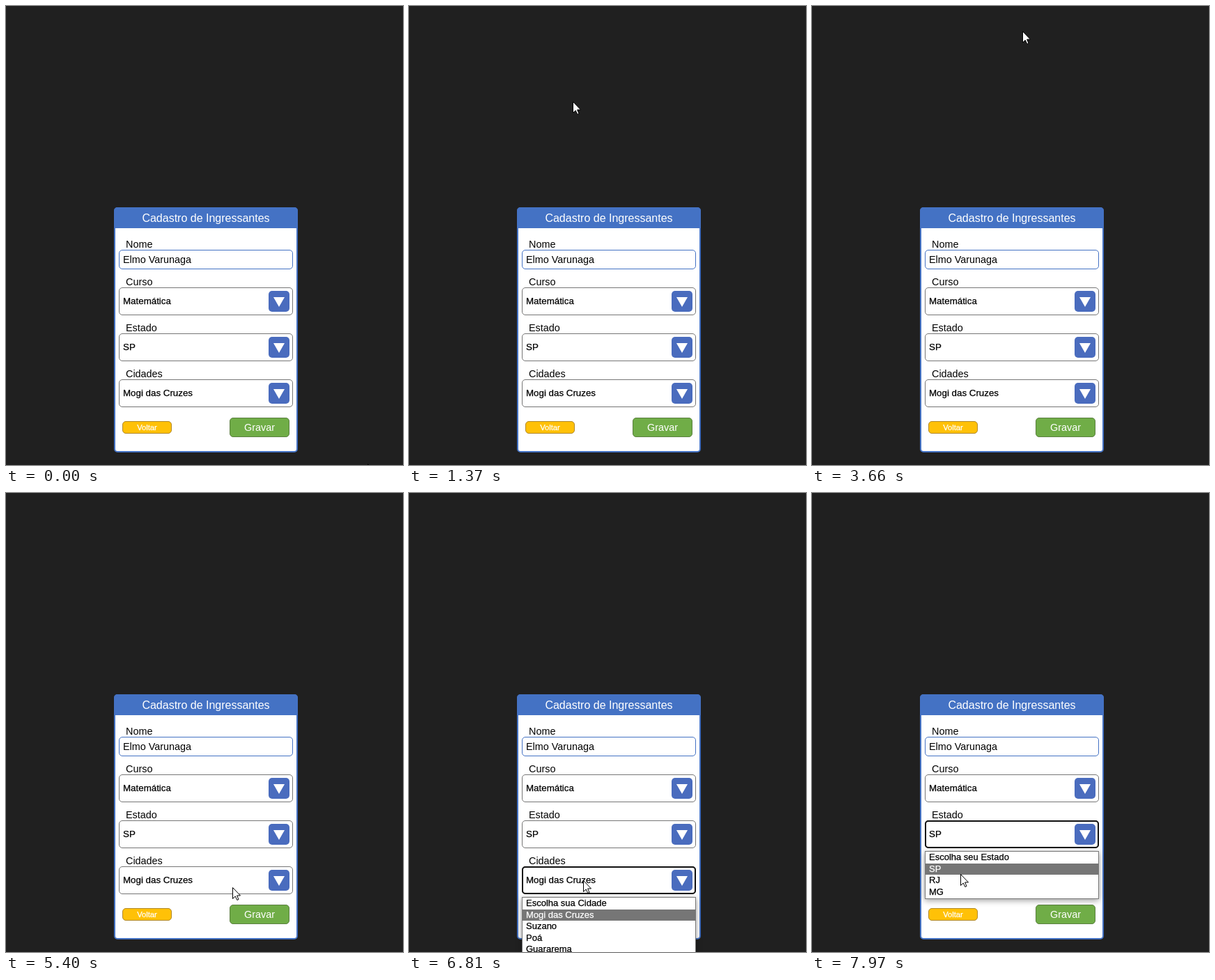
An HTML page that plays this animation: 570x659 px, repeating every 8 s.

```html
<!DOCTYPE html>
<html lang="pt-BR">
<head>
<meta charset="utf-8">
<title>Cadastro de Ingressantes</title>
<style>
  html, body { margin: 0; width: 100%; height: 100%; overflow: hidden; background: #202020; }
  svg { display: block; width: 570px; height: 659px; }
  text { font-family: "Liberation Sans", Arial, sans-serif; font-size: 14.4px; white-space: pre; }
  .title { font-size: 16px; }
  .value { font-size: 13.333px; }
  .item { font-size: 13px; }
  .small { font-size: 11.2px; }
  .value, .item, .small { stroke-width: .25px; }
  .popup { filter: drop-shadow(0 2px 4px rgba(0, 0, 0, .4)); }
</style>
</head>
<body>
<svg id="stage" viewBox="0 0 570 659"></svg>
<script>
const LOOP = 8000;
const BLUE = '#4472c4', GREY = '#767676';
const stage = document.getElementById('stage');

function add(parent, tag, attrs, content) {
  const el = document.createElementNS('http://www.w3.org/2000/svg', tag);
  for (const key in attrs) el.setAttribute(key, attrs[key]);
  if (content) el.textContent = content;
  parent.appendChild(el);
  return el;
}

// The radius and the size are those of the outer edge
function box(parent, x, y, width, height, fill, stroke = 'none', line = 0, radius = 5) {
  return add(parent, 'rect', {
    x: x + line / 2, y: y + line / 2, width: width - line, height: height - line,
    rx: Math.max(0, radius - line / 2), fill, stroke, 'stroke-width': line
  });
}

function write(parent, x, y, content, kind = '', fill = '#000', anchor = 'start') {
  const heavy = ['value', 'item', 'small'].includes(kind);
  return add(parent, 'text', {
    x, y, class: kind, fill, stroke: heavy ? fill : 'none', 'text-anchor': anchor
  }, content);
}

function button(x, y, width, height, label, fill, edge, kind, baseline) {
  box(stage, x, y, width, height, fill, edge, 1);
  write(stage, x + width / 2, baseline, label, kind, '#fff', 'middle');
}

function drawField(top, { label, options }) {
  write(stage, 172, top - 3, label);
  box(stage, 162, top, 250, 40, '#fff', GREY, 1);
  write(stage, 168, top + 24, options[1], 'value');
  box(stage, 377, top + 5, 30, 30, '#4a6cbe');
  add(stage, 'path', { d: `M384 ${top + 14}h16l-8 14z`, fill: '#fff' });
  return box(stage, 162, top, 250, 40, 'none', '#101010', 2);
}

function drawPopup(top, { options }) {
  const pitch = 16.5;
  const group = add(stage, 'g', { class: 'popup' });
  box(group, 162, top, 250, options.length * pitch + 3, '#fff', GREY, 1, 0);
  box(group, 163, top + 18, 248, 16, GREY, 'none', 0, 0);
  options.forEach((option, i) =>
    write(group, 168, top + 13 + Math.round(i * pitch), option, 'item', i === 1 ? '#fff' : '#000'));
  return group;
}

// Form
box(stage, 155, 289, 264, 352, '#fff', BLUE, 2);
box(stage, 155, 289, 264, 30, BLUE);
box(stage, 155, 309, 264, 10, BLUE, 'none', 0, 0);
write(stage, 287, 310, 'Cadastro de Ingressantes', 'title', '#fff', 'middle');
write(stage, 172, 347, 'Nome');
box(stage, 162, 350, 250, 28, '#fff', BLUE, 1);
write(stage, 168, 369, 'Elmo Varunaga');

const fields = [
  { label: 'Curso', options: ['Escolha seu Curso', 'Matemática'] },
  { label: 'Estado', options: ['Escolha seu Estado', 'SP', 'RJ', 'MG'] },
  { label: 'Cidades', options: ['Escolha sua Cidade', 'Mogi das Cruzes', 'Suzano', 'Poá', 'Guararema', 'Salesópolis'] }
];
const fieldTop = i => 404 + 66 * i;
const rings = fields.map((field, i) => drawField(fieldTop(i), field));
button(167, 596, 71, 18, 'Voltar', '#ffc107', '#b0882a', 'small', 609);
button(321, 591, 86, 28, 'Gravar', '#70ad47', '#5b8040', '', 610);
const popups = fields.map((field, i) => drawPopup(fieldTop(i) + 44, field));

const cursor = add(stage, 'path', {
  d: 'M.5 .5V16.5L4.2 13L6.8 18.5L9 17.5L6.6 12H11.5Z', fill: '#fff', stroke: '#000'
});

// The story: the pointer glides and rests, and clicks set the focused and the open field
const NONE = -1, STATE = 1, CITY = 2;
const moves = [], clicks = [];
let clock = 0;
let place = [519, 657];

function glide(duration, ...target) {
  moves.push({ start: clock, duration, from: place, to: target });
  place = target;
  clock += duration;
}
const rest = duration => { clock += duration; };
const click = (focus, open) => clicks.push({ time: clock, focus, open });

click(NONE, NONE);
glide(830, 405, 296);
glide(830, 144, 52);
rest(60);
glide(400, 129, -20);
rest(420);
glide(840, 283, 298);
glide(280, 302, 36);
rest(40);
glide(380, 320, 430);
glide(200, 299, 364);
rest(170);
glide(410, 288, 586);
rest(170);
glide(370, 325, 566);
glide(330, 300, 486);
rest(40);
click(STATE, STATE);
rest(500);
click(STATE, NONE);
rest(140);
glide(320, 250, 556);
rest(40);
click(CITY, CITY);
rest(450);
click(CITY, NONE);
rest(100);
glide(190, 238, 485);
rest(140);
click(STATE, STATE);
glide(320, 213, 547);

function render(t) {
  const { start, duration, from, to } = moves.findLast(move => move.start <= t);
  const p = Math.min(1, (t - start) / duration);
  const [x, y] = from.map((value, axis) => Math.round(value + (to[axis] - value) * p));
  cursor.setAttribute('transform', `translate(${x} ${y})`);

  const { focus, open } = clicks.findLast(state => state.time <= t);
  rings.forEach((ring, i) => { ring.style.display = i === focus ? '' : 'none'; });
  popups.forEach((popup, i) => { popup.style.display = i === open ? '' : 'none'; });
}

const begin = performance.now();
function tick() {
  render(Math.max(0, performance.now() - begin) % LOOP);
  requestAnimationFrame(tick);
}
render(0);
requestAnimationFrame(tick);
</script>
</body>
</html>
```
